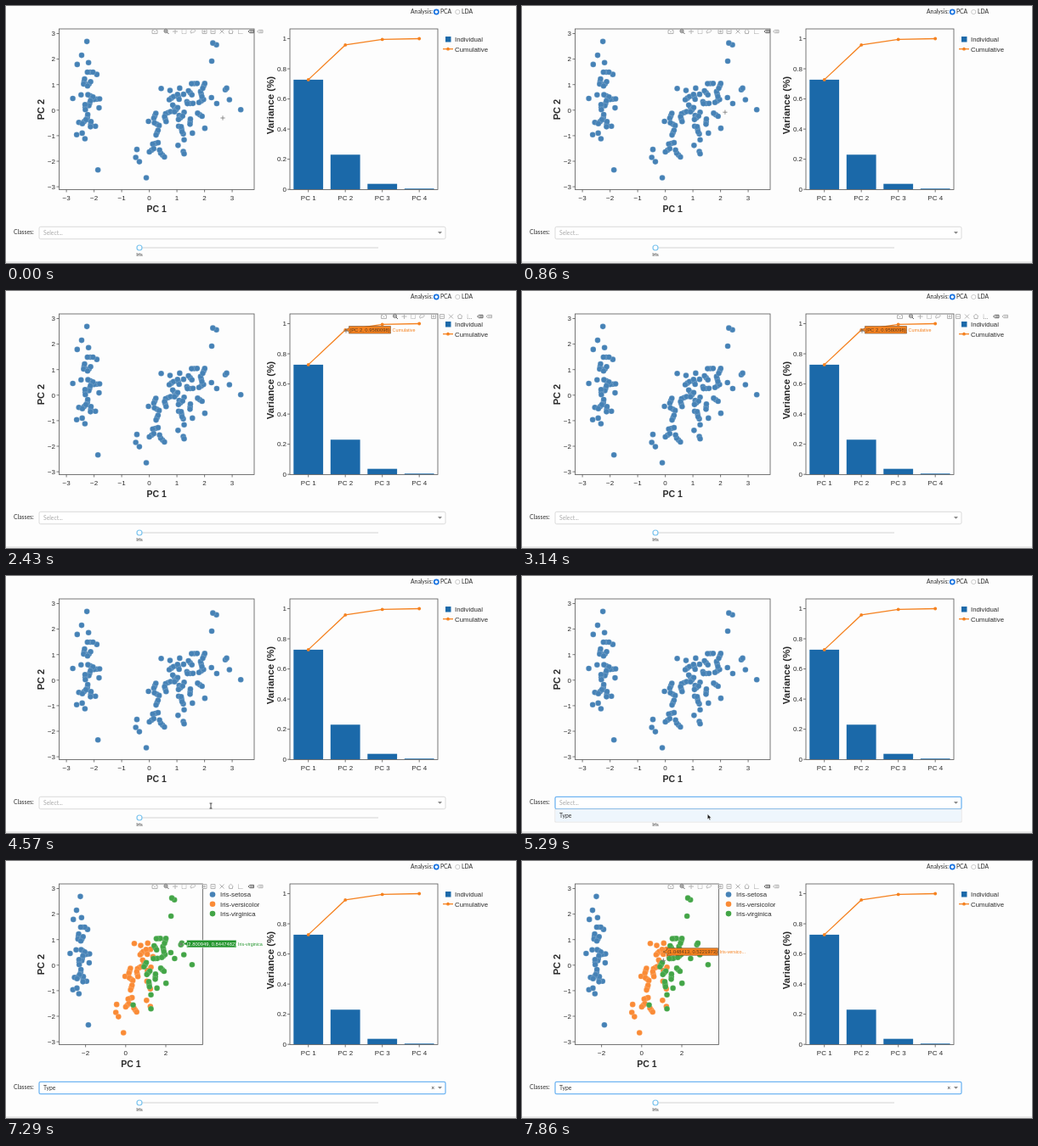
Recreate the animation shown at these times as an HTML page. Size 600 px wide and 303 px high, loop 8000 ms.

```html
<!DOCTYPE html>
<html lang="en">
<head>
<meta charset="utf-8">
<title>Component analysis</title>
<style>
html, body { margin: 0; width: 100%; height: 100%; overflow: hidden; background: #fdfdfd; }
svg { display: block; width: 600px; height: 303px; }
text { font-family: "Liberation Sans", Arial, sans-serif; font-size: 8px; fill: #2b2b2b; }
.ui { font-family: Lato, "Open Sans", sans-serif; font-size: 6.8px; }
.title { font-weight: bold; text-anchor: middle; font-size: 10.5px; }
.dot { stroke: #fff; stroke-opacity: .5; stroke-width: .3; }
.axis { fill: none; stroke: #555; stroke-width: .8; }
.icon { fill: none; stroke: #b4b4b4; stroke-width: 1; }
.icon .on { stroke: #666; }
</style>
</head>
<body>
<svg id="stage" viewBox="0 0 600 303"></svg>
<script>
const LOOP = 8000, STEP = 1000 / 7;
const BLUE = '#4682b6', ORANGE = '#fa8b36', GREEN = '#43a547', BAR = '#1b69a9', LINE = '#f58220';
const stage = document.getElementById('stage');

// "single" holds lone points, "core" holds centres of small clumps: x, y, x, y ...
const species = [
  { name: 'Iris-setosa', color: BLUE, extra: 2,
    single: [-2.26,2.69, -2.45,2.15, -2.61,1.79, -2.2,1.86, -1.9,1.4, -2.77,.46, -1.82,.09,
      -2.55,-.48, -1.95,-.63, -2.63,-.96, -2.43,-.9, -2.33,-1.12, -1.86,-2.34, -2.47,.6],
    core: [-2.14,1.49, -2.36,1.12, -2.18,1.03, -1.9,.43, -2.13,.56, -2.16,.27, -2.32,.12,
      -2.24,-.27, -2.12,-.55, -2.36,-.45] },
  { name: 'Iris-versicolor', color: ORANGE, extra: 2,
    single: [.43,.85, .75,.77, 1.1,.86, 1.24,.62, 1.36,.33, 1.26,-.08, 1.08,-.21, 1.06,-.63,
      1.23,-.93, 1.04,-1.38, 1.23,-1.62, -.49,-1.85, -.36,-2.02, -.45,-1.54, -.11,-2.65, -.03,-.44],
    core: [.8,.47, .91,.12, .68,-.1, .2,-.22, .58,-.35, .27,-.55, .28,-.88, .22,-1.3,
      .08,-1.57, .48,-1.76, 1.05,.52] },
  { name: 'Iris-virginica', color: GREEN, extra: 2,
    single: [2.26,1.92, 2.43,2.56, 2.3,2.63, 3.31,.02, 2.9,.41, 2.01,-.71, .37,-1.56,
      1.26,-1.71, 1.26,-1.16, 1.56,-.9, 2.44,.26, 2.25,.49, 2.75,.8, 2.8,.86],
    core: [1.17,-.75, 1.48,-.45, 1.13,-.3, .97,.02, 1.83,-.18, 1.48,.26, 1.88,.36,
      1.88,.63, 1.48,.68, 1.63,1.04, 1.97,.95] }
];

let seed = 11;
const random = () => (seed = seed * 16807 % 2147483647) / 2147483647;
const pairs = list => list.flatMap((v, i) => i % 2 ? [] : [[v, list[i + 1]]]);
for (const s of species) {
  s.points = pairs(s.single);
  for (const [x, y] of pairs(s.core)) {
    s.points.push([x, y]);
    const turn = random() * Math.PI;
    for (let i = 0; i < s.extra; i++) {
      const a = turn + i * Math.PI;
      s.points.push([x + .1 * Math.cos(a), y + .1 * Math.sin(a)]);
    }
  }
}

const text = (x, y, s, attrs = '') => `<text x="${x}" y="${y}" ${attrs}>${s}</text>`;
const rect = (x, y, w, h, attrs) => `<rect x="${x}" y="${y}" width="${w}" height="${h}" ${attrs}/>`;
const circle = (x, y, r, attrs) => `<circle cx="${x}" cy="${y}" r="${r}" ${attrs}/>`;
const path = (d, attrs = '') => `<path d="${d}" ${attrs}/>`;
const group = (body, attrs = '') => `<g ${attrs}>${body}</g>`;
const label = v => String(v).replace('-', '\u2212');
const middle = 'text-anchor="middle"', end = 'text-anchor="end"';
const upright = (x, y, s, size) =>
  text(0, 0, s, `class="title" style="font-size:${size}px" transform="translate(${x} ${y}) rotate(-90)"`);

const scoreY = v => 122.8 - 30.1 * v;

function scatter({ id, zero, unit, right, ticks, legend }) {
  const px = v => zero + unit * v;
  let out = rect(62.5, 27, right - 62.5, 189.5, 'class="axis"');
  for (const v of ticks) {
    out += path(`M${px(v)} 216.5v3`, 'class="axis"') + text(px(v), 229, label(v), middle);
  }
  for (let v = -3; v <= 3; v++) {
    out += path(`M62.5 ${scoreY(v)}h-3`, 'class="axis"') + text(58, scoreY(v) + 2.8, label(v), end);
  }
  out += text((62.5 + right) / 2, 242.5, 'PC 1', 'class="title"') + upright(45, 122, 'PC 2', 11);
  species.forEach((s, i) => {
    const color = legend ? s.color : BLUE;
    for (const [x, y] of s.points) out += circle(px(x), scoreY(y), 3.3, `class="dot" fill="${color}"`);
    if (legend) {
      const y = 39.5 + 11.3 * i;
      out += circle(243, y, 3.3, `fill="${color}"`) + text(252, y + 2.8, s.name, 'style="font-size:7.8px"');
    }
  });
  return group(out, `id="${id}"`);
}

function varianceChart() {
  const shares = [.7277, .2303, .0368, .0052];
  const py = v => 216.2 - 177.7 * v;
  const px = i => 355.7 + 43.5 * i;
  let out = '', line = '', dots = '', sum = 0;
  shares.forEach((v, i) => {
    sum += v;
    out += rect(px(i) - 17.4, py(v), 34.8, 177.7 * v, `fill="${BAR}"`);
    out += path(`M${px(i)} 216.5v3`, 'class="axis"') + text(px(i), 229, 'PC ' + (i + 1), middle);
    line += (i ? 'L' : 'M') + px(i) + ' ' + py(sum);
    dots += circle(px(i), py(sum), 1.9, `fill="${LINE}"`);
  });
  for (let i = 0; i <= 5; i++) {
    const y = py(i / 5);
    out += path(`M334 ${y}h-3`, 'class="axis"') + text(330, y + 2.8, i / 5, end);
  }
  const stroke = `fill="none" stroke="${LINE}" stroke-width="1.3"`;
  out += path(line, stroke) + dots + rect(334, 27, 174, 189.5, 'class="axis"');
  out += upright(315, 117, 'Variance (%)', 11.5);
  out += rect(517, 36, 6.5, 6.5, `fill="${BAR}"`) + text(528, 42.3, 'Individual', 'style="font-size:7.8px"');
  out += path('M514 50.7h12', stroke) + circle(520, 50.7, 1.9, `fill="${LINE}"`);
  return out + text(528, 53.5, 'Cumulative', 'style="font-size:7.8px"');
}

function modebar() {
  const box = 'M-2.5 -2.5h5v5h-5z', tag = 'M-3 0l2 -1.7h4.5v3.4h-4.5z';
  const icons = [
    [175, 'M-3 -1.5h1.5l.8 -1h1.4l.8 1h1.5v4h-6zM-.8 .5h1.6'],
    [188.5, 'M1.5 -.5a2 2 0 1 1 -4 0a2 2 0 1 1 4 0M1 1l2 2M-1.5 -.5h2', 'on'],
    [199, 'M-3 0h6M0 -3v6'],
    [209.5, box, 'dash'],
    [220, 'M-2 2.5c-2 -2 0 -5 2.5 -5s3 3 0 3.5s-2 0 -2 1'],
    [233.5, box + 'M-1.5 0h3M0 -1.5v3'],
    [243.5, box + 'M-1.5 0h3'],
    [254, 'M-2.5 -2.5l5 5M2.5 -2.5l-5 5'],
    [264.5, 'M-3 0l3 -2.7l3 2.7M-2 0v2.5h4v-2.5'],
    [276, 'M-2.5 2.5v-5M-2.5 2.5h5', 'dash'],
    [288, tag + 'M-1 0h4', 'on'],
    [298.5, tag + 'M-1 0h4']
  ];
  return group(icons.map(([x, d, kind]) => path(d, `transform="translate(${x} 30)" `
    + (kind === 'on' ? 'class="on"' : kind ? 'stroke-dasharray="1.2 .8"' : ''))).join(''),
    'id="modebar" class="icon"');
}

function controls() {
  const radio = (x, on) => circle(x, 7, 2.6, on ? 'fill="#fff" stroke="#1a73e0" stroke-width="1.7"'
    : 'fill="#fff" stroke="#aaa" stroke-width=".6"');
  const ui = 'class="ui"';
  return text(476, 9, 'Analysis:', ui) + radio(506.3, true) + text(511, 9, 'PCA', ui)
    + radio(531.3, false) + text(536, 9, 'LDA', ui)
    + text(9, 269.3, 'Classes:', ui)
    + rect(39, 260.3, 478, 14.4, 'id="select" rx="1.7" fill="#fff"')
    + text(44, 270, '', 'id="choice" class="ui"')
    + text(502.3, 269.8, '\u00d7', `id="clear" class="ui" ${middle}`)
    + path('M508 266h5l-2.5 2.7z', 'fill="#888"')
    + path('M157 285h281', 'stroke="#e2e2e2" stroke-width="1.7"')
    + circle(157, 285, 3, 'fill="#fff" stroke="#7cc4ee" stroke-width="1.2"')
    + text(157, 294.5, 'Iris', `class="ui" style="font-size:5.6px" ${middle}`)
    + path('M0 302h600', 'stroke="#d5d5d5" stroke-width="1"')
    + group(rect(39, 275, 478, 15, 'fill="#fff" stroke="#ccc" stroke-width=".6"')
      + rect(39.5, 275.5, 477, 14, 'fill="#eef6fd"') + text(44, 285, 'Type', ui), 'id="menu"');
}

stage.innerHTML =
  scatter({ id: 'plain', zero: 168.6, unit: 32.5, right: 292, ticks: [-3, -2, -1, 0, 1, 2, 3] })
  + scatter({ id: 'classed', zero: 140.8, unit: 23.6, right: 231.5, ticks: [-2, 0, 2], legend: true })
  + varianceChart() + modebar() + controls()
  + group('', 'id="hover"') + path('', 'id="cursor"');

const part = Object.fromEntries([...stage.querySelectorAll('[id]')].map(e => [e.id, e]));
const show = (el, on) => { el.style.display = on ? '' : 'none'; };

// from, to, tip x, tip y, box width, fill, ink, text, series name
const hovers = [
  [1280, 1850, 191, 129.3, 65, BAR, '#fff', '(0.6621261, \u22120.2243461)', ''],
  [2420, 3420, 399, 45.8, 49, LINE, '#5a3a1c', '(PC 2, 0.9580098)', 'Cumulative'],
  [7140, 7420, 208, 97.6, 58.5, '#23952d', '#fff', '(2.800949, 0.8447482)', 'Iris-virginica'],
  [7420, 7700, 186, 105, 58.5, '#23952d', '#fff', '(1.857352, 0.5604284)', 'Iris-virginica'],
  [7700, 7850, 167, 128, 60, LINE, '#5a3a1c', '(1.071904, \u22120.2077263)', 'Iris-versico...'],
  [7850, 8000, 166, 107, 60, LINE, '#5a3a1c', '(1.048413, 0.5221973)', 'Iris-versico...']
];

function hoverLabel([, , x, y, w, fill, ink, value, series]) {
  const small = 'style="font-size:5.8px;fill:';
  return path(`M${x} ${y}l4.5 -2v-2.3h${w}v8.6h${-w}v-2.3z`, `fill="${fill}" stroke="${ink}" stroke-width=".5"`)
    + text(x + 4.5 + w / 2, y + 2.1, value, `${small}${ink}" ${middle}`)
    + text(x + w + 6.5, y + 2, series, `style="font-size:5.4px;fill:${fill}"`);
}

// time, x, y
const route = [
  [0, 255, 132], [1140, 236, 124], [1710, 228, 116], [2000, 312, 84], [2290, 400, 47],
  [3430, 400, 47], [3860, 370, 257], [4570, 241, 271], [4860, 241, 269], [5430, 214, 283],
  [6290, 214, 283], [6860, 190, 150], [7290, 206, 98], [7570, 186, 104], [7720, 167, 127], [8000, 166, 107]
];

function cursorAt(t) {
  const i = Math.max(1, route.findIndex(k => k[0] >= t));
  const [t0, x0, y0] = route[i - 1], [t1, x1, y1] = route[i];
  const p = (t - t0) / (t1 - t0), e = p * p * (3 - 2 * p);
  return [x0 + (x1 - x0) * e, y0 + (y1 - y0) * e];
}

function drawCursor(x, y, classed) {
  const inPlot = y > 27 && y < 216 && ((x > 62 && x < (classed ? 231 : 292)) || (x > 334 && x < 508));
  const inSelect = y > 260 && y < 274.5 && x > 39 && x < 500;
  const arrow = !inPlot && !inSelect;
  const d = inPlot ? 'M-2.6 0h5.2M0 -2.6v5.2'
    : inSelect ? 'M-1.5 -3h3M0 -3v6M-1.5 3h3' : 'M0 0v6l1.4 -1.2l1 2.2l1 -.5l-1 -2.1h1.9z';
  part.cursor.setAttribute('d', d);
  part.cursor.setAttribute('transform', `translate(${x} ${y})`);
  part.cursor.setAttribute('fill', arrow ? '#111' : 'none');
  part.cursor.setAttribute('stroke', arrow ? '#fff' : inPlot ? '#777' : '#222');
  part.cursor.setAttribute('stroke-width', arrow ? .4 : .8);
}

function draw(time) {
  const t = Math.floor((time + 4) / STEP) * STEP;
  const [x, y] = cursorAt(t);
  const chosen = t > 5400, focused = t > 4700;

  show(part.plain, !chosen);
  show(part.classed, chosen);
  show(part.menu, t > 4840 && !chosen);
  show(part.clear, chosen);
  part.choice.textContent = chosen ? 'Type' : 'Select...';
  part.choice.style.fill = chosen ? '#333' : '#aaa';
  part.select.setAttribute('stroke', focused ? '#70b5f2' : '#ccc');
  part.select.setAttribute('stroke-width', focused ? 1.3 : .7);

  show(part.modebar, y > 12 && y < 252);
  part.modebar.setAttribute('transform', `translate(${x > 305 ? 269.5 : 0} 0)`);

  const hover = hovers.find(h => t >= h[0] && t < h[1]);
  part.hover.innerHTML = hover ? hoverLabel(hover) : '';
  drawCursor(x, y, chosen);
}

function tick() {
  draw(performance.now() % LOOP);
  requestAnimationFrame(tick);
}
tick();
</script>
</body>
</html>
```
